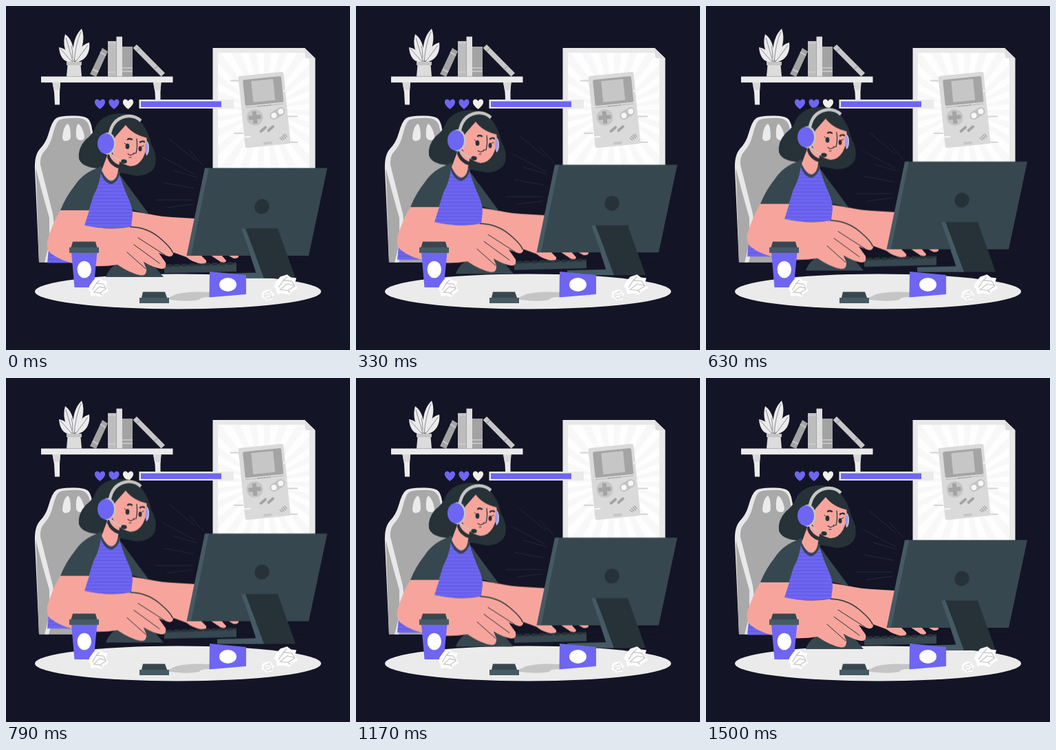
Write an HTML page that moves like this. It is 500 by 500 pixels and loops after 1540 ms.

```html
<!DOCTYPE html>
<html lang="en">
<head>
<meta charset="utf-8">
<title>Gamer at desk</title>
<style>
  html, body { margin: 0; width: 100%; height: 100%; overflow: hidden; background: #131425; }
  svg { display: block; width: 100vw; height: 100vh; }
  .bob { animation: bob 770ms cubic-bezier(.364, 0, .636, 1) -50ms infinite alternate; }
  @keyframes bob { to { transform: translateY(-9.7px); } }
  .purple { fill: #6e66f2; }
  .light { fill: #ebebeb; }
  .slate { fill: #37474f; }
  .steel { fill: #455a64; }
  .ink { fill: #263238; }
  .skin { fill: #f7a59c; }
  .line { fill: none; stroke: #263238; stroke-linecap: round; stroke-linejoin: round; }
</style>
</head>
<body>
<svg viewBox="0 0 500 500">
  <defs>
    <clipPath id="sheet"><path d="M308 68H434L441 76V250H308Z"/></clipPath>
    <pattern id="stripes" width="10" height="5.2" patternUnits="userSpaceOnUse">
      <rect class="purple" width="10" height="5.2"/>
      <rect y="3.6" width="10" height="1.2" fill="#5f56de"/>
    </pattern>
    <path id="heart" d="M0 7.5C-5 3.5-7.6.5-7.6-3C-7.6-7.5-2-8.5 0-4C2-8.5 7.6-7.5 7.6-3C7.6.5 5 3.5 0 7.5Z"/>
    <g id="ball">
      <path d="M-14-3L-8-11L1-14L6-10L13-9L11-2L15 5L8 9L4 14L-4 12L-12 13L-13 6L-16 3Z" fill="#fff"/>
      <path d="M-10 4L-4-6L7-5L11 2L2 8L-8 7L1-1L10 1M-4-6L1-11M2 8L5 11" fill="none" stroke="#c9c9c9" stroke-width="1.3"/>
    </g>
  </defs>

  <!-- poster -->
  <path d="M300.5 61H434L449.5 76V250H300.5Z" fill="#e9e9e9"/>
  <g clip-path="url(#sheet)">
    <rect x="300" y="60" width="150" height="190" fill="#fefefe"/>
    <circle cx="375" cy="151" r="70" pathLength="48" fill="none" stroke="#f8f8f8" stroke-width="140" stroke-dasharray="1"/>
  </g>
  <path d="M434 61L435 74Q435 76 437 76H449.5Z" fill="#dfdfdf"/>
  <path d="M326 108.5H339M408 160.5H424M331 185H345M411 198H424" stroke="#d4d4d4" stroke-width="2"/>
  <g transform="translate(337.5 102) rotate(-5.7)">
    <rect width="66" height="105" rx="3" fill="#dadada"/>
    <rect x="6" y="6" width="56" height="38" rx="2" fill="#a4a4a4"/>
    <rect x="18" y="9" width="32" height="31" fill="#c6c6c6"/>
    <path d="M6 46.5H62" stroke="#b8b8b8"/>
    <path d="M24 46.5H43" stroke="#a4a4a4" stroke-width="1.5" stroke-dasharray="3 1"/>
    <circle cx="18" cy="62" r="12" fill="#c6c6c6"/>
    <path d="M9 62H27M18 53V71" stroke="#a4a4a4" stroke-width="6"/>
    <path d="M46 62L56.5 57" stroke="#c2c2c2" stroke-width="12" stroke-linecap="round"/>
    <g fill="#f7f7f7"><circle cx="46" cy="62" r="4"/><circle cx="56.5" cy="57" r="4"/></g>
    <path d="M25 83L32 78M36 83L43 78" stroke="#a4a4a4" stroke-width="4" stroke-linecap="round"/>
    <path d="M51 95L55 99M53.5 93L57.5 98M56 91L60 97M58.5 90L62 95" stroke="#a4a4a4" stroke-width="1.3"/>
    <rect x="27" y="99" width="12" height="4" fill="#c6c6c6"/>
    <path d="M63 28H68M0 89H9" stroke="#f7f7f7" stroke-width="2"/>
  </g>

  <!-- shelf -->
  <g id="bracket">
    <path class="light" d="M67.5 111H79L78 125V143.5H71L70 125Z"/>
    <path d="M67.5 111H79L78 122H69.5Z" fill="#d8d8d8"/>
  </g>
  <use href="#bracket" x="146.5"/>
  <path d="M140 61L148 66L131 103L122 99Z" fill="#a3a3a3"/>
  <path d="M137 67L145 72M126 92L134 96" stroke="#c8c8c8" stroke-width="2"/>
  <path d="M148 51H160.5V102.5H148Z" fill="#bdbdbd"/>
  <path d="M160.5 44.5H169V102.5H160.5Z" fill="#dedede"/>
  <path d="M169 59H184V102.5H169Z" fill="#a3a3a3"/>
  <path d="M148 54H160M148 96H160M169 90H184M169 95H184" stroke="#cecece" stroke-width="1.5"/>
  <path d="M190 56L231 97.5L225.5 102.5L184.5 61Z" fill="#c7c7c7"/>
  <path d="M195 61L189.5 66M221 87L215 92" stroke="#a3a3a3" stroke-width="1.5"/>
  <g class="light">
    <path d="M98 82C85 70 82 54 86 41C96 48 101 64 98 82Z"/>
    <path d="M96 82C84 82 78 74 77 60C88 62 95 70 96 82Z"/>
    <path d="M101 82C102 68 108 57 121 53C123 68 115 80 101 82Z"/>
    <path d="M99 82C95 62 99 43 110 33C116 48 110 68 99 82Z"/>
    <path d="M99 82Q101 55 109 37M97 80L87 46M95 80L79 62M102 80L119 57M97 76Q97 64 95 58" fill="none" stroke="#4b4c58" stroke-width=".6"/>
  </g>
  <path d="M89.5 85H108.5L110 102.5H88Z" fill="#dcdcdc"/>
  <path d="M88 81H110V86H88Z" fill="#c4c4c4"/>
  <rect class="light" x="51" y="102.5" width="191.5" height="8.7"/>

  <!-- status -->
  <use href="#heart" x="136.5" y="142.5" class="purple"/>
  <use href="#heart" x="157" y="142.5" class="purple"/>
  <use href="#heart" x="177.5" y="142.5" fill="#f1f0ec"/>
  <rect class="light" x="193.5" y="136" width="137.5" height="13"/>
  <rect class="purple" x="196" y="138.5" width="117" height="8.4"/>

  <!-- chair -->
  <path d="M48 373L42 238Q41 217 49 208Q58 199 62 185Q67 167 73 163Q78 159.5 96 159.5Q112 159 118 163Q123 166 125 178L140 260V340L100 373Z" fill="#e8e8e8"/>
  <path d="M50 231Q49 219 55 212Q64 203 68 187Q72 170 77 166Q82 163 96 163Q110 162 115 166Q120 169 122 179L138 260V340L100 373H62L72 335L68 302Z" fill="#a9a9a9"/>
  <path d="M43.5 236Q50 262 63 308V345L56 373H48Z" fill="#a9a9a9"/>
  <path class="light" d="M90 171Q83 175 82 192Q83 197 88 196Q94 195 94 190Q94 175 90 171ZM105 171Q101 175 102 190Q103 195 109 195Q114 195 114 189Q111 175 105 171Z"/>

  <path d="M45 373H440" stroke="#0b0c17" stroke-width=".8" opacity=".5"/>
  <ellipse class="light" cx="250" cy="415" rx="208" ry="25.5"/>

  <g class="bob">
    <path d="M237 193L276 225M266 209L287 232M228 220L275 245M243 239L277 249M230 257L273 265M217 282H272M234 293L272 288" stroke="#2a2f3e" stroke-width=".9"/>
    <path d="M63 344L60 373.5H110V344Z" fill="url(#stripes)"/>

    <!-- back hair -->
    <path class="ink" d="M165 156Q141 157 131 174Q127 186 116 194Q104 207 106 222Q110 234 132 236L190 247Q212 246 217 231Q220 215 211 201Q207 180 194 166Q183 155 165 156Z"/>
    <path class="line" d="M117 196Q104 214 112 229M211 203Q221 224 207 242" stroke-width=".7"/>

    <!-- keyboard and far arm -->
    <path d="M230 378L335 373.5V386L230 388.5Z" fill="#37474f"/>
    <path d="M233 377.5L334 374" stroke="#263238" stroke-width="4" stroke-dasharray="8.5 2.5"/>
    <path class="skin" d="M180 298L206 302Q225 306.5 250 307.5L275 309L300 335L338 363Q339 367 331 367L322 362H313L320 370Q320 374 312 372L297 362H283L291 370Q293 375 283 374.5Q272 373 262 365L240 357L180 330Z"/>

    <!-- torso -->
    <path class="slate" d="M137 234Q112 242 100 261Q87 277 79 297H122L142 250ZM160 242Q168 247 174 257L208 303L182 296L164 262Z"/>
    <path d="M138 235Q138 257 127 276L113.5 319Q150 327 182 321L184 304Q184 294 179 282Q170 263 164 241Z" fill="url(#stripes)"/>
    <path class="line" d="M137 235Q143 256 153 257Q160 255 164 243" stroke-width="4" style="stroke:#37474f"/>
    <path class="skin" d="M149 212L139 239Q146 254 154 254Q160 252 162 244L166 222Z"/>
    <path class="ink" d="M149 211Q151 228 170 233L163 236Q151 232 147 220Z"/>

    <!-- head -->
    <path class="skin" d="M155 190Q160 174 172 171L190 180L204 188Q207 206 199 221Q192 233 181 233Q162 229 154 212Z"/>
    <path class="ink" d="M156 196Q155 170 170 164Q196 162 206 192Q184 187 174 173Q166 182 159 190Z"/>
    <path d="M150.500 189Q153 165 174 160.500Q187 158.500 196 167" fill="none" stroke="#c6c6c4" stroke-width="4.500"/>
    <ellipse cx="205" cy="207" rx="3" ry="9.500" fill="#9c98f5"/>
    <path d="M205 197Q210 207 204 217" fill="none" stroke="#c6c6c4" stroke-width="1.5"/>
    <ellipse cx="148" cy="200" rx="11.5" ry="16" fill="#c6c6c4"/>
    <ellipse class="purple" cx="145" cy="200" rx="12" ry="14.8"/>
    <path d="M151 213Q158 222 168 225" fill="none" stroke="#c6c6c4" stroke-width="1.6"/>
    <ellipse class="ink" cx="171.5" cy="226" rx="4.3" ry="3" transform="rotate(10 171.5 226)"/>
    <ellipse class="ink" cx="176.5" cy="204" rx="2.9" ry="4"/>
    <ellipse class="ink" cx="195" cy="207.5" rx="2.5" ry="3.8"/>
    <path class="line" d="M174 201L172 199M197 204.500L200 203" stroke-width="1"/>
    <path class="line" d="M177 194Q179 192 183 194M195 198Q198 195.500 201 197.500" stroke-width="2.4"/>
    <path class="line" d="M190 193Q191.500 205 189 214L185 214M177 215L181 217L186 215M179 220L182 220" stroke-width="1.2"/>

    <!-- near arm -->
    <path class="slate" d="M145 394Q151 376 170 372L212 374L229 394Z"/>
    <path class="skin" d="M79 297L121 297L114 319Q150 327 181 321Q203 322 221 336Q239 350 243 359Q243 365 236 364L222 359L232 373Q234 383 225 382Q214 380 200 372L204 382Q205 392 196 391.5Q181 389 162 376Q145 379 125 378Q85 375 66 360Q58 355 60 341Q68 315 79 297Z"/>
    <path class="line" d="M181 321Q205 322 222 336Q239 350 242 358" stroke-width="1.5"/>
    <path class="line" d="M192 337L231 362M186 347L223 374M176 358L203 382" stroke-width="1"/>

    <!-- monitor -->
    <path class="steel" d="M307 389L369 387.5L373 396H307Z"/>
    <path class="steel" d="M342 323H350L377 396H366Z"/>
    <path class="ink" d="M348 323H395L421 396H375Z"/>
    <path class="slate" d="M294 235.5H467L440 363H267Z"/>
    <path class="steel" d="M289 235.5H295L269 363H262.5Z"/>
    <path class="steel" d="M342 323.5H349L364 363H356Z"/>
    <path class="ink" d="M348 323.5H395L409 363H363Z"/>
    <ellipse class="ink" cx="372" cy="291.5" rx="10.5" ry="11" transform="rotate(35 372 291.5)"/>
  </g>

  <!-- desk items -->
  <path class="purple" d="M95 358H132.5L127.5 409H99.5Z"/>
  <ellipse cx="113.8" cy="383" rx="10.2" ry="12.3" fill="#fff"/>
  <path class="slate" d="M97 342.5H130L132.5 351H94.5Z"/>
  <rect class="steel" x="92" y="350.8" width="43" height="8"/>
  <use href="#ball" transform="translate(135 409) scale(.95 1)"/>
  <path d="M233 426Q238 423 247 419Q265 414 296 416V423Q282 423 281 427Q263 431 233 426Z" fill="#c5c5c5"/>
  <path class="purple" d="M296 386L349 391V419L295.5 423.5Z"/>
  <ellipse cx="322.5" cy="405" rx="12.5" ry="10" fill="#fff"/>
  <path class="slate" d="M199 415.5H231L234 424H197Z"/>
  <rect class="steel" x="194" y="424" width="43" height="8"/>
  <use href="#ball" transform="translate(407.5 405) scale(1.12 1.05)"/>
  <use href="#ball" transform="translate(381 420) rotate(30) scale(.6)"/>
</svg>
</body>
</html>
```
